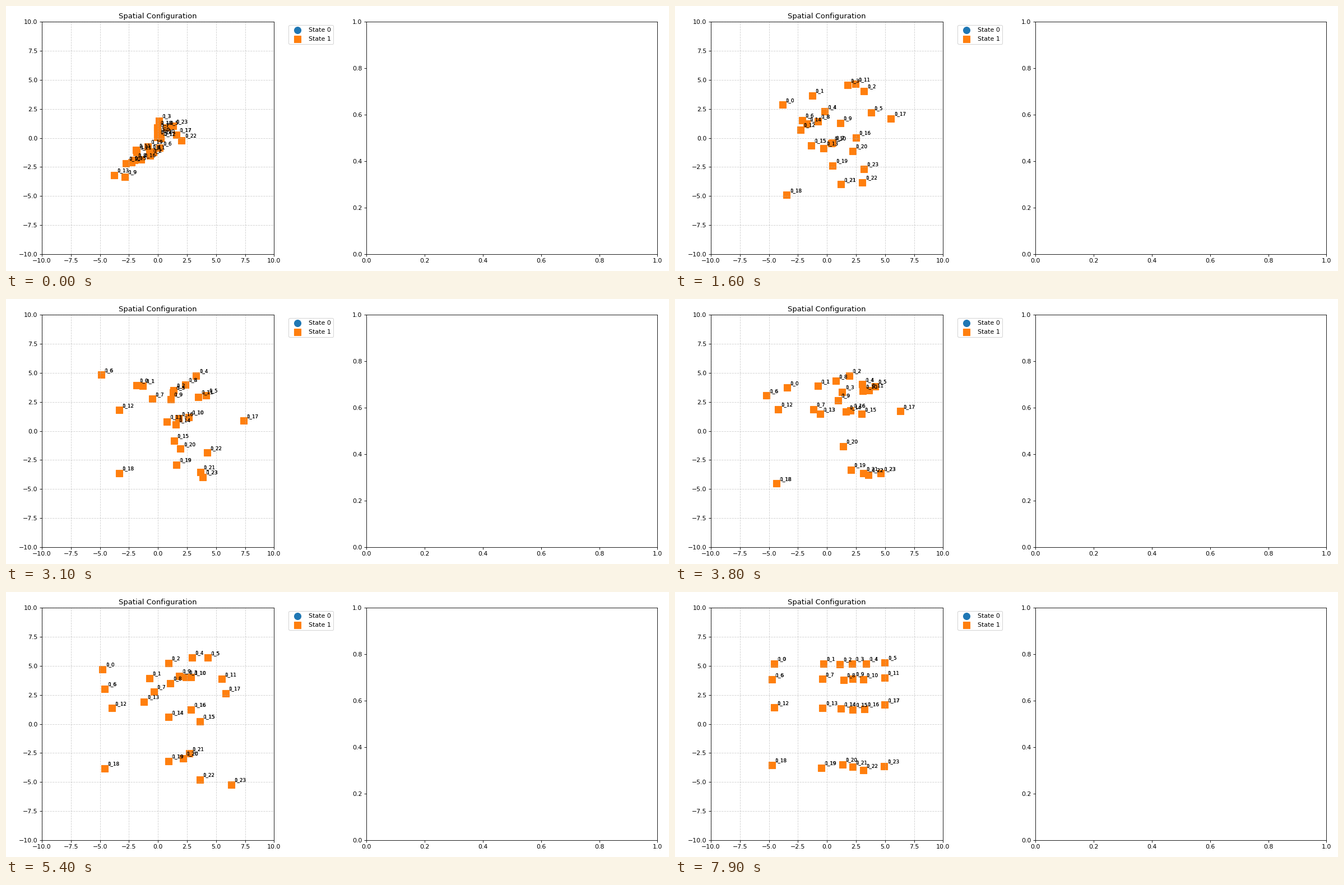
Write a matplotlib script that moves like this. It is 1183x473 px and loops after 8 s.

```python
import numpy as np
import matplotlib.pyplot as plt
from matplotlib.animation import FuncAnimation

WIDTH, HEIGHT, DPI = 1183, 473, 1183 / 15
STEPS, INTERVAL = 80, 100
TOP, BOTTOM = 28.2, 442.8
COLUMNS = [-4.7, -0.4, 1.3, 2.2, 3.2, 4.9]
ROWS = [5.25, 3.85, 1.45, -3.7]
MEMORY = 0.93  # share of the noise kept from one step to the next


def diffuse():
    """Positions per step: a noisy cloud that settles into a grid."""
    rng = np.random.default_rng(7)
    grid = np.array([(x, y) for y in ROWS for x in COLUMNS])
    noise = rng.standard_normal(grid.shape)
    noise[:, 1] = 0.7 * (noise[:, 0] + noise[:, 1])  # diagonal first cloud
    steps = []
    for progress in np.linspace(0, 1, STEPS):
        pull = 1 - np.exp(-7 * progress)
        spread = 1.4 * (1 - progress) ** 0.8 + 0.1
        steps.append(pull * grid + spread * noise)
        kick = rng.standard_normal(grid.shape)
        noise = MEMORY * noise + np.sqrt(1 - MEMORY ** 2) * kick
    return np.array(steps)


positions = diffuse()
fig = plt.figure(figsize=(WIDTH / DPI, HEIGHT / DPI), dpi=DPI)


def add_axes(left, right):
    return fig.add_axes([left / WIDTH, 1 - BOTTOM / HEIGHT,
                         (right - left) / WIDTH, (BOTTOM - TOP) / HEIGHT])


ax = add_axes(64.1, 478.3)
ax.set(xlim=(-10, 10), ylim=(-10, 10), title="Spatial Configuration")
ticks = np.arange(-10, 10.1, 2.5)
ax.set_xticks(ticks)
ax.set_yticks(ticks)
ax.grid(True, linestyle="--", alpha=0.6)
add_axes(643.3, 1162.4)

clouds, labels = [], []
for state, marker in enumerate("os"):
    clouds.append(ax.scatter(*positions[0].T, s=120, marker=marker,
                             label=f"State {state}"))
    labels.append([ax.annotate(f"{state}_{node}", point, (5, 5),
                               textcoords="offset points", fontsize=8)
                   for node, point in enumerate(positions[0])])
ax.legend(loc="upper left", bbox_to_anchor=(1.05, 1))


def update(step):
    for cloud, texts in zip(clouds, labels):
        cloud.set_offsets(positions[step])
        for text, point in zip(texts, positions[step]):
            text.xy = point
    return clouds


animation = FuncAnimation(fig, update, frames=STEPS, interval=INTERVAL,
                          repeat=True, repeat_delay=0)
plt.show()
```
